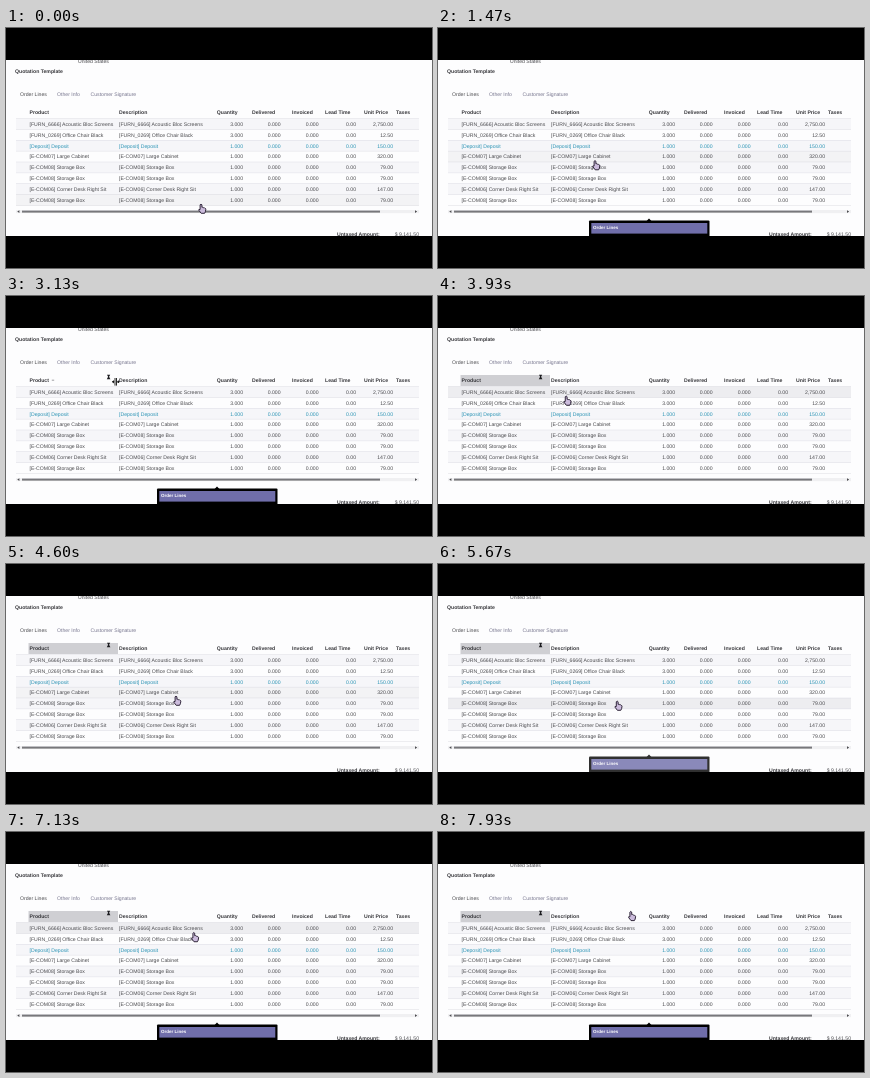
Recreate the animation shown at these times as an HTML page. Size 426 by 240 pixels, loop 8 s.

```html
<!DOCTYPE html>
<html lang="en">
<head>
<meta charset="utf-8">
<title>Quotation order lines</title>
<style>
html, body { margin: 0; width: 100%; height: 100%; overflow: hidden; background: #000; }
svg { display: block; width: 100vw; height: 100vh; }
text {
  font: 5.15px "Liberation Sans", Arial, sans-serif;
  fill: #4a4a4e;
  white-space: pre;
  text-rendering: geometricPrecision;
}
.bold { font-weight: 700; fill: #37373b; }
.tab { fill: #77768f; }
.info { fill: #2a93b4; }
.tip { font-size: 4.5px; font-weight: 700; fill: #fff; }
.end { text-anchor: end; }
</style>
</head>
<body>
<svg id="stage" viewBox="0 0 426 240">
  <clipPath id="page"><rect y="32" width="426" height="176"/></clipPath>
  <rect width="426" height="240"/>
  <g clip-path="url(#page)">
    <rect y="32" width="426" height="176" fill="#fdfdfe"/>
    <g id="table"></g>
    <rect id="hover" x="10" width="403" height="10.85" fill="#50506e" opacity=".06"/>
    <g id="texts"></g>
    <path id="caret" d="M45.8 84.2h2.4" stroke="#77777c" stroke-width=".7"/>
    <path id="sort" d="M101 78.8h3.2l-1.1 2 1.3 2.5h-3.6l1.3-2.5z" fill="#1b1b1f"/>
    <rect x="10" y="182" width="403" height="3.2" fill="#f0f0f2"/>
    <rect x="16" y="182.6" width="358" height="2" fill="#77777b"/>
    <path d="M13.4 182.2v2.8l-2.2-1.4zM409 182.2v2.8l2.2-1.4z" fill="#4d4d51"/>
    <g id="tooltip">
      <path d="M208.6 193l2.4-2.6 2.4 2.6z"/>
      <rect x="151" y="192.5" width="120.5" height="16" rx="1"/>
      <rect x="153.3" y="195" width="116" height="10.6" fill="#706eaa"/>
      <text class="tip" x="155" y="201.2">Order Lines</text>
    </g>
    <g id="cursor">
      <path id="hand" fill="#cbbbdc" stroke="#1d1428" stroke-width=".9" stroke-linejoin="round"
        d="M-.9 .8Q0-.6 .9 .8V3.3Q2 2.8 2.5 3.7 3.6 3.4 4 4.4 4.8 4.4 4.8 5.3L4.4 7.7 3.6 9.3H.2L-2.2 6.2Q-2.6 5-.9 5.5Z"/>
      <path id="resize" fill="#111" stroke="#111" stroke-width=".9"
        d="M-.7-3.8V3.8M.8-3.8V3.8M-1.5 0H-2.6M1.5 0H2.8M-2.2-1V1L-3.4 0ZM2.4-1V1L3.6 0Z"/>
    </g>
  </g>
</svg>
<script>
const LOOP = 8000, ROW_TOP = 90.6, ROW_H = 10.85;
const $ = id => document.getElementById(id);

function add(parent, tag, attrs, content = "") {
  const el = document.createElementNS("http://www.w3.org/2000/svg", tag);
  for (const key in attrs) el.setAttribute(key, attrs[key]);
  el.textContent = content;
  parent.append(el);
  return el;
}
const label = (x, y, content, cls = "") => add($("texts"), "text", { x, y, class: cls }, content);
const box = (x, y, width, height, fill) => add($("table"), "rect", { x, y, width, height, fill });

const lines = [
  ["[FURN_6666] Acoustic Bloc Screens", 3, "2,750.00"],
  ["[FURN_0269] Office Chair Black", 3, "12.50"],
  ["[Deposit] Deposit", 1, "150.00"],
  ["[E-COM07] Large Cabinet", 1, "320.00"],
  ["[E-COM08] Storage Box", 1, "79.00"],
  ["[E-COM08] Storage Box", 1, "79.00"],
  ["[E-COM06] Corner Desk Right Sit", 1, "147.00"],
  ["[E-COM08] Storage Box", 1, "79.00"]
];
const heads = [
  ["Product", 23.5], ["Description", 113], ["Quantity", 210.8], ["Delivered", 246],
  ["Invoiced", 286], ["Lead Time", 319], ["Unit Price", 358], ["Taxes", 390]
];

label(72, 35.4, "United States");
label(9, 44.8, "Quotation Template", "bold");
label(14, 67.6, "Order Lines");
label(51, 67.6, "Other Info", "tab");
label(84.5, 67.6, "Customer Signature", "tab");
label(331, 207.8, "Untaxed Amount:", "bold");
label(413, 207.8, "$ 9,141.50", "end");

const active = box(22.5, 79, 89.5, 11, "#cfcfd3");
for (const [name, x] of heads) label(x, 86, name, "bold");

lines.forEach(([name, qty, price], i) => {
  const y = ROW_TOP + i * ROW_H, base = y + 7.2;
  const cls = i === 2 ? "info" : "";
  if (i % 2 === 0) box(10, y, 403, ROW_H, "#f6f6f9");
  box(10, y - .3, 403, .6, "#e2e2e8");
  label(23.5, base, name, cls);
  label(113, base, name, cls);
  const cells = [[237, qty + ".000"], [274.5, "0.000"], [312.5, "0.000"], [350, "0.00"], [387, price]];
  for (const [x, value] of cells) label(x, base, value, cls + " end");
});
box(10, ROW_TOP + 8 * ROW_H - .3, 403, .6, "#e2e2e8");

// time, x, y of the pointer
const path = [
  [0, 195, 176], [250, 195, 176], [1300, 157, 132.5], [1900, 157, 132.5],
  [2650, 102, 79.5], [2800, 102, 79.5], [3080, 109.7, 85.8], [3600, 109.7, 85.8],
  [4500, 170, 132], [4700, 170, 132], [5300, 179.2, 137], [6600, 179.2, 137],
  [7500, 192.8, 79.3], [LOOP, 192.8, 79.3]
];
const clamp = v => Math.max(0, Math.min(1, v));
const ease = v => v * v * (3 - 2 * v);

function pointer(t) {
  const i = path.findIndex(p => p[0] > t);
  const [t0, x0, y0] = path[i - 1], [t1, x1, y1] = path[i];
  const k = ease((t - t0) / (t1 - t0));
  return [x0 + (x1 - x0) * k, y0 + (y1 - y0) * k];
}

const show = (el, on) => el.setAttribute("visibility", on ? "visible" : "hidden");

function render(t) {
  const [x, y] = pointer(t);
  const resizing = t >= 2950 && t < 3750;
  $("cursor").setAttribute("transform", `translate(${x} ${y})`);
  show($("resize"), resizing);
  show($("hand"), !resizing);

  const row = Math.floor((y - ROW_TOP) / ROW_H);
  show($("hover"), row >= 0 && row < lines.length);
  $("hover").setAttribute("y", ROW_TOP + row * ROW_H);

  show($("sort"), t >= 2750);
  show($("caret"), t >= 2750 && t < 3500);
  show(active, t >= 3500);

  const fade = t < 3500 ? clamp((t - 1000) / 150) : clamp((t - 5550) / 150);
  $("tooltip").setAttribute("opacity", fade);
}

function tick() {
  render(performance.now() % LOOP);
  requestAnimationFrame(tick);
}
tick();
</script>
</body>
</html>
```
